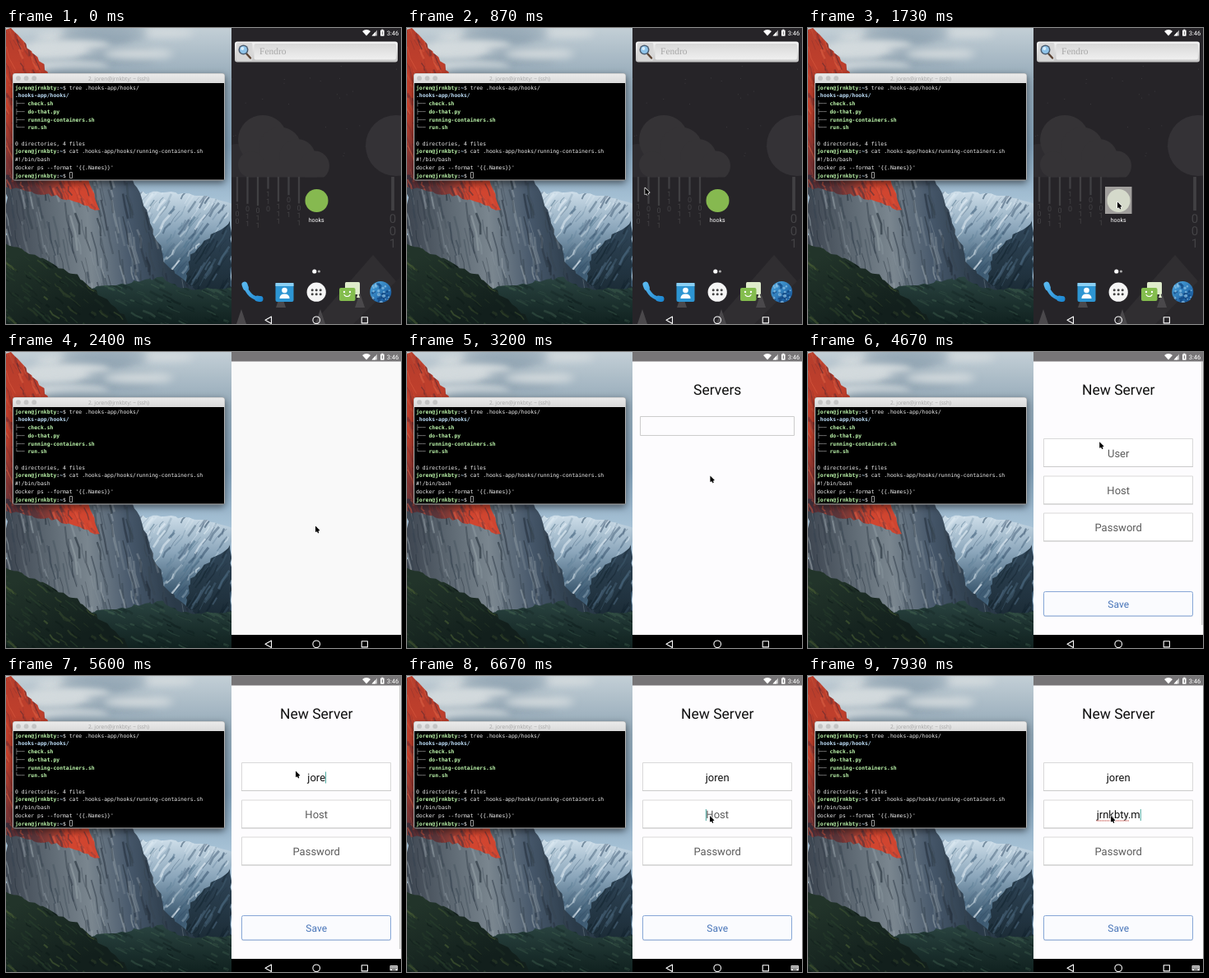
Animation, 480 px wide and 360 px high, one loop 8000 ms. Source, as an HTML page with a canvas:

```html
<!DOCTYPE html>
<html lang="en">
<head>
<meta charset="utf-8">
<title>Terminal and phone</title>
<style>
html, body { margin: 0; width: 100%; height: 100%; overflow: hidden; background: #000; }
canvas { display: block; width: 480px; height: 360px; }
</style>
</head>
<body>
<canvas id="stage" width="480" height="360"></canvas>
<script>
const LOOP = 8000;
const USER = 'joren', HOST = 'jrnkbty';
const SANS = 'Roboto, sans-serif', MONO = '"DejaVu Sans Mono", monospace';
const PHONE = 274, MID = 377.2;
const ctx = document.getElementById('stage').getContext('2d');
let g = ctx;

const clamp = v => Math.max(0, Math.min(1, v));
const span = (t, a, b) => clamp((t - a) / (b - a));
const mix = (a, b, p) => a + (b - a) * p;
const smooth = p => p * p * (3 - 2 * p);
const easeOut = p => 1 - (1 - p) ** 3;

function layer(paint) {
  const c = document.createElement('canvas');
  c.width = 480; c.height = 360;
  g = c.getContext('2d');
  g.textRendering = 'geometricPrecision';
  paint();
  g = ctx;
  return c;
}
function random(seed) {
  return () => (seed = (seed * 16807) % 2147483647) / 2147483647;
}
function rect(x, y, w, h, color) { g.fillStyle = color; g.fillRect(x, y, w, h); }
function frame(x, y, w, h, color, r = 0) {
  g.beginPath(); g.roundRect(x + .5, y + .5, w - 1, h - 1, r);
  g.strokeStyle = color; g.lineWidth = 1; g.stroke();
}
function round(x, y, w, h, r, color) {
  g.beginPath(); g.roundRect(x, y, w, h, r); g.fillStyle = color; g.fill();
}
function disc(x, y, r, color, ry = r) {
  g.beginPath(); g.ellipse(x, y, r, ry, 0, 0, 7); g.fillStyle = color; g.fill();
}
function poly(color, ...pts) {
  g.beginPath();
  for (const [x, y] of pts) g.lineTo(x, y);
  g.closePath(); g.fillStyle = color; g.fill();
}
const peak = (x, y, w, h, color) => poly(color, [x, y - h], [x + w / 2, y], [x - w / 2, y]);
function shade(x0, y0, x1, y1, ...colors) {
  const s = g.createLinearGradient(x0, y0, x1, y1);
  colors.forEach((c, i) => s.addColorStop(i / (colors.length - 1), c));
  return s;
}
function text(str, x, y, font, color, align = 'left') {
  g.font = font; g.fillStyle = color; g.textAlign = align;
  g.fillText(str, x, y);
  return g.measureText(str).width;
}

// A landform: key corners joined by rough edges, textured with slanted strokes
function land(seed, fill, keys, { rough = 4, n = 60, tones = [], lean = 0, len = 20 }) {
  const rnd = random(seed), shape = new Path2D();
  keys.forEach(([x, y], i) => {
    const [nx, ny] = keys[(i + 1) % keys.length];
    const steps = Math.ceil(Math.hypot(nx - x, ny - y) / 6);
    for (let k = 0; k < steps; k++)
      shape.lineTo(mix(x, nx, k / steps) + (rnd() - .5) * rough, mix(y, ny, k / steps) + (rnd() - .5) * rough);
  });
  const xs = keys.map(k => k[0]), ys = keys.map(k => k[1]);
  const left = Math.min(...xs), right = Math.max(...xs), top = Math.min(...ys), bottom = Math.max(...ys);
  g.save();
  g.fillStyle = fill; g.fill(shape); g.clip(shape);
  for (let i = 0; i < n; i++) {
    const x = mix(left, right, rnd()), y = mix(top, bottom, rnd()) - len / 2, l = len * (.4 + rnd());
    g.globalAlpha = .2 + rnd() * .4;
    g.lineWidth = .6 + rnd() * 2.4;
    g.strokeStyle = tones[i % tones.length];
    g.beginPath(); g.moveTo(x, y);
    g.lineTo(x + lean * l * .5 + (rnd() - .5) * 5, y + l / 2);
    g.lineTo(x + lean * l, y + l);
    g.stroke();
  }
  g.restore();
}

function paintValley() {
  rect(0, 0, PHONE, 360, shade(0, 0, 0, 215, '#c3cfd6', '#8fa5b5', '#7f9db5', '#a9c4d8'));
  const rnd = random(5);
  g.filter = 'blur(5px)';
  for (let i = 0; i < 16; i++)
    disc(30 + rnd() * 250, rnd() * 60, 25 + rnd() * 30, i % 2 ? '#d3dadd' : '#93a6b4', 4 + rnd() * 4);
  g.filter = 'none';

  land(31, shade(0, 198, 0, 290, '#cfdfea', '#8ba6bb', '#3f5c73'),
    [[150, 200], [210, 201], [238, 204], [274, 214], [274, 320], [180, 320]],
    { n: 190, tones: ['#35506a', '#557790', '#e9f3f9'], lean: -.7, len: 16 });
  land(12, shade(0, 235, 0, 325, '#31475a', '#1a2a34'),
    [[274, 234], [274, 330], [214, 320], [226, 275], [250, 252]],
    { n: 60, tones: ['#12222d', '#4d6a80'], lean: -.6 });
  land(7, shade(0, 250, 200, 235, '#3d4550', '#5b6670', '#7a868f', '#46576a', '#2a3a48'),
    [[0, 130], [148, 170], [163, 205], [195, 288], [240, 330], [0, 345]],
    { n: 330, tones: ['#222d38', '#98a3aa', '#36434f'], lean: .2, len: 32 });
  land(19, shade(0, 0, 0, 190, '#b53d2c', '#c9412c', '#6b343a'),
    [[8, 0], [52, 55], [50, 185], [-9, 185], [-9, 0]],
    { n: 150, tones: ['#4a2933', '#e86a4a', '#7b2f31'], lean: .4 });
  land(23, shade(0, 0, 114, 0, '#3e2f3b', '#5d3539', '#d2452f', '#cf4530'),
    [[-9, 180], [97, 180], [114, 222], [62, 205], [-9, 192]],
    { n: 80, tones: ['#47303b', '#e25b41', '#8c3330'], lean: .4, len: 14 });
  land(43, shade(0, 305, 0, 360, '#29423f', '#10211f'),
    [[95, 318], [190, 304], [215, 318], [285, 316], [285, 370], [90, 370]],
    { n: 130, tones: ['#3c5a4b', '#0c1a1a'], lean: 2, len: 6 });
  land(41, shade(20, 275, 60, 360, '#22342a', '#121f1c'),
    [[-9, 258], [46, 281], [90, 304], [145, 350], [150, 370], [-9, 370]],
    { n: 190, tones: ['#4d6236', '#0c1716', '#2b432f'], lean: 1.2, len: 9 });
}

function paintTerminal() {
  g.shadowColor = '#0008'; g.shadowBlur = 8; g.shadowOffsetY = 3;
  round(8, 55, 258, 130.5, 3, '#b4b4b4');
  g.shadowColor = 'transparent';
  round(8.5, 55.5, 257, 12, [3, 3, 0, 0], shade(0, 55, 0, 67, '#ececec', '#dadada'));
  rect(9, 67, 256, 117.5, '#000');
  for (let i = 0; i < 3; i++) disc(15 + i * 9.6, 61.2, 2.9, '#c4c4c4');
  text(`2. ${USER}@${HOST}: ~ (ssh)`, 137, 63.7, '6.6px "Open Sans", sans-serif', '#a4a4a4', 'center');

  const bold = `bold 6.43px ${MONO}`, plain = `6.43px ${MONO}`;
  const green = '#bdf7ac', blue = '#bfe0fa', grey = '#f0f0f0';
  const out = str => [[str, grey, plain]];
  const prompt = cmd => [[`${USER}@${HOST}`, green, bold], [':', grey, bold], ['~', blue, bold], ['$ ' + cmd, grey, plain]];
  const file = (name, mark = '├') => [[mark + '── ', '#c4c4c4', plain], [name, green, bold]];
  const lines = [
    prompt('tree .hooks-app/hooks/'),
    [['.hooks-app/hooks/', blue, bold]],
    file('check.sh'), file('do-that.py'), file('running-containers.sh'), file('run.sh', '└'),
    [], out('0 directories, 4 files'),
    prompt('cat .hooks-app/hooks/running-containers.sh'),
    out('#!/bin/bash'),
    out("docker ps --format '{{.Names}}'"),
    prompt('')
  ];
  lines.forEach((line, i) => {
    let x = 11;
    for (const [str, color, font] of line) x += text(str, x, 74.6 + i * 9.73, font, color);
  });
  frame(77, 175, 4, 8, '#9c9c9c');
}

function paintSky() {
  const rnd = random(77);
  rect(PHONE, 0, 206, 360, '#262428');
  for (let i = 0; i < 40; i++) rect(PHONE + rnd() * 206, 45 + rnd() * 130, .8, .8, '#49474b');

  // Clouds with flat undersides, then binary rain
  g.save();
  g.beginPath(); g.rect(PHONE, 60, 206, 121.5); g.clip();
  disc(281, 165, 24, '#2e2c30');
  disc(474, 143, 37, '#343236');
  for (let i = 0; i < 4; i++) disc(312 + i * 21, 136 + i * 10.5, 30 - i * 4, '#353336');
  disc(298, 166, 16, '#353336');
  rect(298, 160, 80, 22, '#353336');
  g.restore();
  const drip = (x, end, size, digits) => {
    rect(x - size / 8, 181, size / 4, end - 181, '#414043');
    for (let i = 0; i < digits; i++)
      text(rnd() < .5 ? '0' : '1', x, end + size * (i + 1), `${size}px ${SANS}`, '#434245', 'center');
  };
  for (let i = 0; i < 7; i++) drip(281 + i * 12.5, 195 + rnd() * 22, 9, 3);
  drip(470, 222, 15, 3);

  peak(446, 362, 150, 86, '#302e31');
  peak(480, 362, 120, 60, '#29272a');
  for (let i = 0; i < 4; i++) peak(286 + i * 48, 360 - i % 2 * 20, 12, 18, '#4a484b');
}

function paintDock() {
  disc(374.8, 296, 2.6, '#fff'); disc(380.4, 296, 1.6, '#aaa');
  // Handset
  g.lineCap = 'round';
  g.strokeStyle = shade(288, 310, 312, 334, '#5cbaf0', '#1683cf');
  for (const [w, a, b] of [[4.5, 0, 1], [7, 0, .12], [7, .88, 1]]) {
    const at = p => [mix(290, 309, p) - 9 * p * (1 - p), mix(312, 329.5, p) + 16 * p * (1 - p)];
    g.lineWidth = w; g.beginPath();
    for (let i = 0; i <= 8; i++) g.lineTo(...at(mix(a, b, i / 8)));
    g.stroke();
  }
  // Contact card
  round(327.5, 310, 22, 23, 2, '#2d95d2');
  rect(327.5, 310, 22, 4, '#8bd0f3');
  disc(338.5, 319, 3.3, '#fff'); round(332.5, 323.5, 12, 5.5, [5, 5, 0, 0], '#fff');
  // Drawer
  disc(MID, 321.2, 11.6, '#f5f5f5');
  for (let i = 0; i < 6; i++) disc(MID - 5 + i % 3 * 5, 318.8 + (i > 2) * 5, 1.5, '#444');
  // Messages
  round(412, 309, 18, 15, 1.5, '#dfeccb');
  peak(428, 328, 4, 6, '#dfeccb');
  round(405, 316, 19.5, 16, 2, '#84bd4e');
  disc(411, 321, 1.2, '#fff'); disc(418, 321, 1.2, '#fff');
  g.lineWidth = 1.2; g.strokeStyle = '#fff';
  g.beginPath(); g.arc(414.5, 322.5, 4, .5, 2.6); g.stroke();
  // Globe
  const rnd = random(9);
  g.save();
  g.beginPath(); g.arc(455.3, 321, 13, 0, 7); g.clip();
  rect(440, 306, 30, 30, shade(445, 310, 466, 334, '#4aa3dc', '#124f92'));
  for (let i = 0; i < 45; i++)
    disc(442 + rnd() * 26, 308 + rnd() * 26, .6 + rnd() * 1.6, i % 2 ? '#9fd0ee99' : '#0d3d7799');
  g.restore();
}

function paintSearch() {
  round(278, 16.5, 198, 25, 3, shade(0, 16, 0, 41, '#f6f6f6', '#c4c4c4'));
  round(280, 18, 19.5, 22, 2, '#d7d7d7');
  round(301.5, 19, 172.5, 19.5, 2, shade(0, 19, 0, 38, '#d8d8d8', '#efefef'));
  g.lineWidth = 2.4; g.lineCap = 'round'; g.strokeStyle = '#5c4433';
  g.beginPath(); g.moveTo(292.5, 31.5); g.lineTo(297, 36.5); g.stroke();
  disc(288.5, 26.5, 6, '#4c5d70'); disc(288.5, 26.5, 4.5, '#8fc4ea'); disc(287.3, 25, 2, '#d8effb');
  text('Fendro', 308, 32.3, '11.5px "Liberation Serif", serif', '#a8a8a8');
}

const backdrop = layer(() => { paintValley(); paintTerminal(); });
const home = layer(() => { paintSky(); paintSearch(); paintDock(); });
ctx.textRendering = 'geometricPrecision';

function drawHome(t) {
  g.drawImage(home, 0, 0);
  const pressed = t > 1620 && t < 1900;
  if (pressed) rect(361, 193, 32.5, 33, '#a19f9d');
  disc(377.5, 210, 14, pressed ? '#d5dacb' : '#86b950');
  text('hooks', MID, 236, `7px ${SANS}`, '#fff', 'center');
}

const title = str => text(str, MID, 52, `17.5px ${SANS}`, '#111', 'center');

function drawServers(p) {
  const zoom = 1 + .045 * p;
  g.save();
  g.translate(MID, 178); g.scale(zoom, zoom); g.translate(-MID, -178);
  g.globalAlpha = 1 - .6 * p;
  title('Servers');
  frame(283, 78, 188, 24, '#ccc');
  g.restore();
}

const typed = (str, t, start, step) => str.slice(0, Math.max(0, Math.floor((t - start) / step) + 1));

// entry: { str, from, step } typed into the field; focus shows the caret
function drawField(y, hint, t, focus, entry) {
  const value = entry ? typed(entry.str, t, entry.from, entry.step) : '';
  rect(286, y, 182, 35, '#fff');
  frame(286, y, 182, 35, '#d9d9d9');
  rect(286, y + 34, 182, 1, '#cbcbcb');
  const w = text(value || hint, MID, y + 22.8, `13px ${SANS}`, value ? '#111' : '#5c5c5c', 'center');
  if (!focus) return;
  const left = MID - w / 2;
  const last = value ? entry.from + (value.length - 1) * entry.step : entry.from - 400;
  if ((t - last) % 1000 < 500) rect(value ? left + w : left - .5, y + 11.5, 1, 14, '#4aa79f');
  if (value && entry.spell) {
    const end = left + g.measureText(value.slice(0, HOST.length)).width;
    for (let x = left; x < end; x += 2) rect(x, y + 25, 1.3, 1, '#c4453d');
  }
}

function drawForm(t, dx) {
  g.save();
  g.translate(dx, 0);
  rect(PHONE, 11, 206, 333, '#fdfcfe');
  title('New Server');
  drawField(105, 'User', t, t > 4850 && t < 6500, { str: USER, from: 5100, step: 150 });
  drawField(150.5, 'Host', t, t >= 6500, { str: HOST + '.m', from: 6900, step: 118, spell: true });
  drawField(195.5, 'Password', t, false);
  round(286, 291, 182, 31, 2, '#d5dbe5');
  round(286, 291, 182, 30, 2, '#fafbfe');
  frame(286, 291, 182, 30.5, '#86a6d6', 2);
  text('Save', MID, 310.7, `12px ${SANS}`, '#4774b8', 'center');
  g.globalAlpha = 1 - span(t, 5900, 6200);
  if (dx === 0) rect(478, 12, 1.5, 320, '#ccc');
  g.restore();
}

function drawApp(t) {
  const open = easeOut(span(t, 1950, 2250));
  if (!open) return;
  g.save();
  g.beginPath(); g.rect(PHONE, 11, 206, 333); g.clip();
  g.globalAlpha = open;
  rect(PHONE, 11 + (1 - open) * 40, 206, 333, t < 2700 ? '#f9f9f9' : '#fdfcfe');
  if (t >= 2700) {
    const p = easeOut(span(t, 3900, 4320));
    if (p < 1) drawServers(p);
    if (p > 0) drawForm(t, 206 * (1 - p));
  }
  g.restore();
}

function drawBars(t) {
  g.globalAlpha = span(t, 1950, 2150);
  rect(PHONE, 0, 206, 11.5, '#777577');
  rect(PHONE, 344, 206, 16, '#000');
  g.globalAlpha = 1;
  // Status: wifi, signal, battery, clock
  g.beginPath(); g.moveTo(438, 9.5); g.arc(438, 9.5, 7.5, -2.3, -.84); g.closePath();
  g.fillStyle = '#fff'; g.fill();
  poly('#fff9', [451, 2.5], [451, 9.5], [444.5, 9.5]);
  poly('#fff', [449, 4.7], [449, 9.5], [444.5, 9.5]);
  round(455, 2.5, 4.6, 7.2, .6, '#fff'); rect(456.3, 1.6, 2, 1, '#fff');
  rect(456.8, 4.2, 1, 4, '#666');
  text('3:46', 477.3, 8.8, `7.6px ${SANS}`, '#fff', 'right');
  // Navigation: back, home, recent
  g.strokeStyle = '#fff'; g.lineWidth = 1.1; g.lineJoin = 'round';
  g.beginPath(); g.moveTo(315, 355.3); g.lineTo(322.5, 351); g.lineTo(322.5, 359.5); g.closePath(); g.stroke();
  g.beginPath(); g.arc(MID, 355.3, 4.3, 0, 7); g.stroke();
  g.strokeRect(432.2, 351.7, 7.2, 7.2);
  if (t > 4900) {
    round(466.5, 352, 9.5, 6.6, .8, '#ddd');
    for (let i = 0; i < 8; i++) rect(467.6 + i % 4 * 2, 353.2 + (i > 3) * 1.8, 1.1, 1, '#222');
    rect(469, 356.8, 4.5, .9, '#222');
  }
}

// Pointer moves: begin, end, x, y
const MOVES = [[700, 1450, 376, 211.5], [2850, 3550, 361, 90], [4400, 4800, 352, 115.5], [6050, 6420, 368, 170]];

function drawPointer(t) {
  if (t < MOVES[0][0]) return;
  let x = 276, y = 192;
  for (const [a, b, px, py] of MOVES) {
    const p = smooth(span(t, a, b));
    x = mix(x, px, p); y = mix(y, py, p);
  }
  g.save();
  g.translate(x, y);
  g.lineJoin = 'round'; g.lineCap = 'butt';
  for (const [color, grow] of [['#fff', 1.4], ['#000', 0]]) {
    poly(color, [0, 0], [0, 7.6], [5.5, 5.4]);
    g.strokeStyle = color;
    if (grow) { g.lineWidth = grow; g.stroke(); }
    g.lineWidth = 1.4 + grow;
    g.beginPath(); g.moveTo(2, 5); g.lineTo(3.7, 8.6); g.stroke();
  }
  g.restore();
}

function draw(t) {
  g.drawImage(backdrop, 0, 0);
  g.save();
  g.beginPath(); g.rect(PHONE, 0, 206, 360); g.clip();
  drawHome(t);
  drawApp(t);
  drawBars(t);
  g.restore();
  drawPointer(t);
}

const begin = performance.now();
function tick() {
  draw((performance.now() - begin) % LOOP);
  requestAnimationFrame(tick);
}
tick();
</script>
</body>
</html>
```
